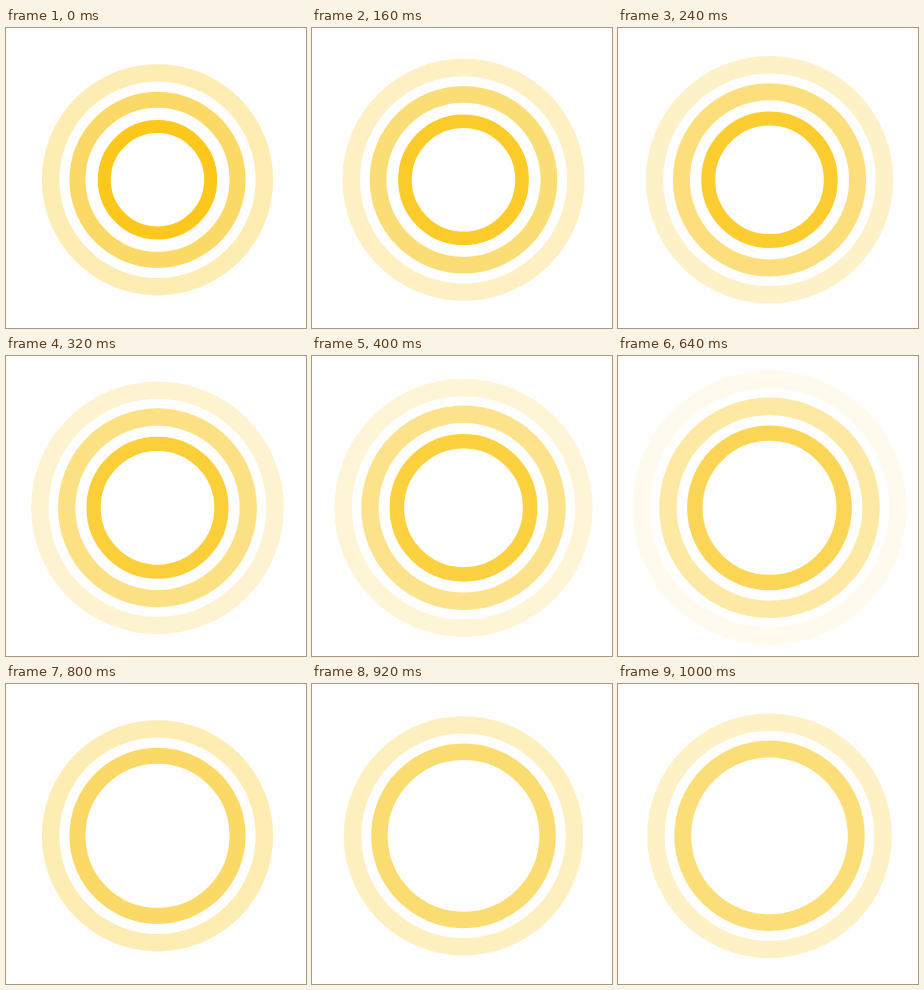
Animation, 300 px wide and 300 px high, one loop 1040 ms. Source, as an HTML page:

```html
<!DOCTYPE html>
<html lang="en">
<head>
<meta charset="utf-8">
<title>Pulsing rings</title>
<style>
  html, body { margin: 0; width: 100%; height: 100%; overflow: hidden; background: #fefefe; }
  svg { display: block; width: 100%; height: 100%; }
  circle { fill: none; stroke: #fbc81b; }
</style>
</head>
<body>
<svg viewBox="0 0 300 300">
  <circle cx="151.5" cy="151.8"/>
  <circle cx="151.5" cy="151.8"/>
  <circle cx="151.5" cy="151.8"/>
</svg>
<script>
  const LOOP = 1040, STEP = 40, SPACING = 800, LIFE = 2400;
  const rings = document.querySelectorAll('circle');

  // Each ring grows and thickens while fading out over its life.
  function draw(now) {
    const time = Math.floor((now % LOOP) / STEP) * STEP;
    rings.forEach((ring, i) => {
      const age = (time + i * SPACING) / LIFE;
      ring.setAttribute('r', 53.2 + 80.6 * age);
      ring.setAttribute('stroke-width', Math.min(17.4, 13 + 9.2 * age));
      ring.setAttribute('stroke-opacity', Math.max(0, 1 - age));
    });
  }

  const start = performance.now();
  function tick() {
    draw(performance.now() - start);
    requestAnimationFrame(tick);
  }
  tick();
</script>
</body>
</html>
```
